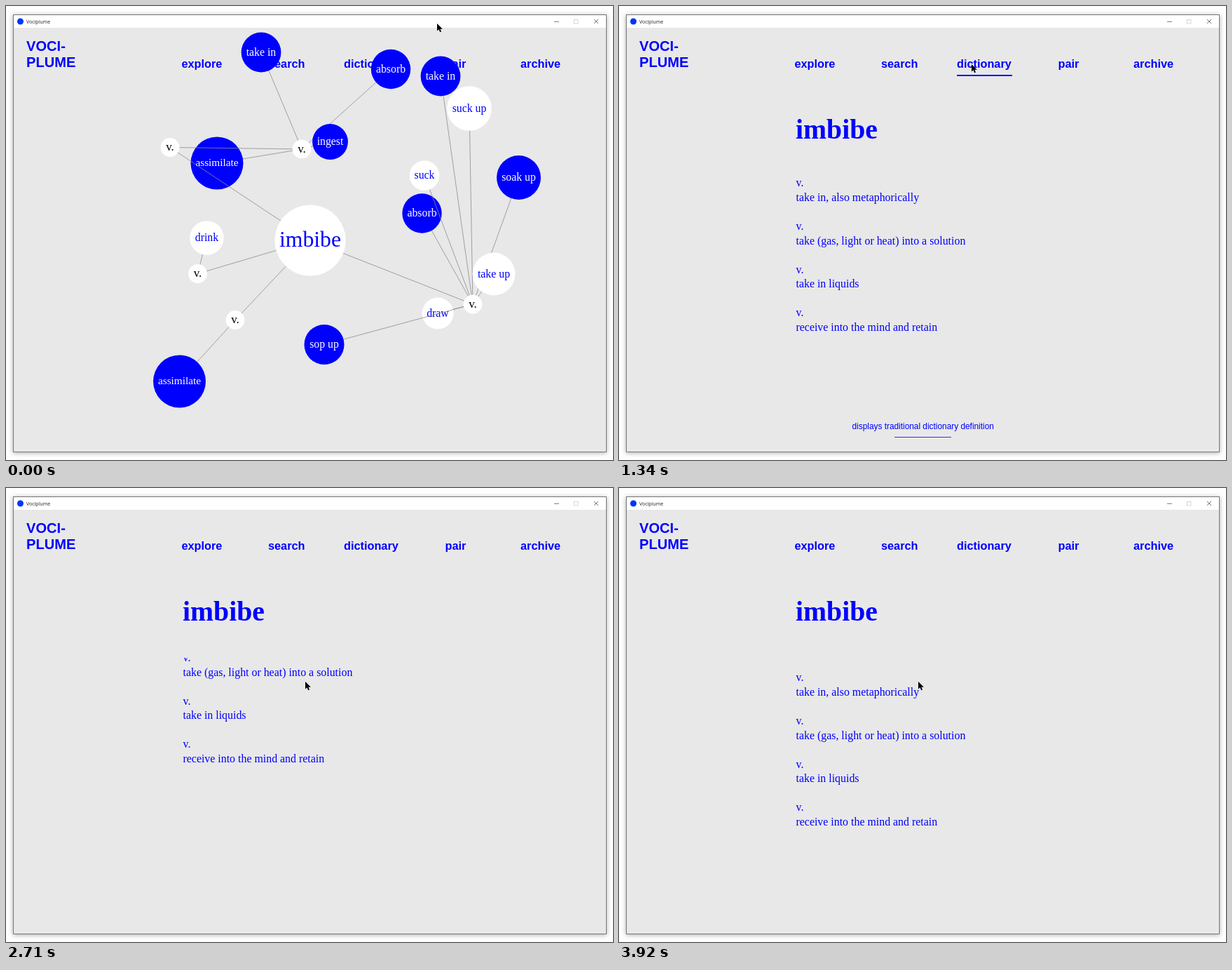
An HTML page that plays this animation: 866x647 px, repeating every 4070 ms.

```html
<!DOCTYPE html>
<html lang="en">
<head>
<meta charset="utf-8">
<title>Vociplume</title>
<style>
  html, body { margin: 0; width: 100%; height: 100%; overflow: hidden; background: #fefefe; }
  svg { display: block; }
  text { fill: #00f; white-space: pre; }
  .serif { font: 15.9px "Liberation Serif", serif; }
  .node { text-anchor: middle; }
  .sans { font: 11.87px "Liberation Sans", sans-serif; }
  .nav { font: bold 16.3px "Liberation Sans", sans-serif; }
  .brand { font: bold 20.1px "Liberation Sans", sans-serif; }
  .caption { font: 7px "Open Sans", sans-serif; fill: #222; }
  .head { font: bold 39.7px "Liberation Serif", serif; }
  .edge { stroke: #8c8c8c; stroke-width: .8; }
  .window { fill: #e8e8e8; filter: drop-shadow(0 1px 3px #0005); }
</style>
</head>
<body>
<svg width="866" height="647" viewBox="0 0 866 647">
  <defs><clipPath id="pane"><rect x="240" y="242" width="400" height="330"/></clipPath></defs>
  <rect class="window" x="10" y="12" width="847" height="624"/>
  <rect x="10" y="12" width="847" height="19" fill="#fff"/>
  <rect x="10.5" y="12.5" width="846" height="623" fill="none" stroke="#777"/>
  <circle cx="20.5" cy="22" r="4.5" fill="#0433ff"/>
  <text class="caption" x="29" y="24.7">Vociplume</text>
  <g fill="none" stroke="#555" stroke-width=".8">
    <path d="M782 22.3h7M839 19l6 6m0-6l-6 6"/>
    <rect x="810.5" y="19.5" width="5.5" height="5.5" stroke="#ccc"/>
  </g>
  <text class="brand" x="29" y="64">VOCI-</text>
  <text class="brand" x="29" y="87">PLUME</text>
  <g id="nav"></g>
  <rect id="underline" x="482" y="98" width="79" height="2" fill="#00f"/>
  <g id="graph"></g>
  <g id="entry">
    <text class="head" x="252" y="189">imbibe</text>
    <g clip-path="url(#pane)"><g id="list"></g></g>
  </g>
  <g id="hint">
    <text class="sans" x="332.5" y="603">displays traditional dictionary definition</text>
    <path d="M393 614.5h81" stroke="#00f" stroke-width=".8"/>
  </g>
  <path id="cursor" d="M0 0V10.5L2.5 8.3L4.2 12.2L6 11.4L4.4 7.7H7.8Z"/>
</svg>
<script>
const $ = id => document.getElementById(id);

function add(parent, tag, attrs, content = "") {
  const el = document.createElementNS("http://www.w3.org/2000/svg", tag);
  for (const key in attrs) el.setAttribute(key, attrs[key]);
  el.textContent = content;
  parent.append(el);
}

[["explore", 250.5], ["search", 374], ["dictionary", 482], ["pair", 626.5], ["archive", 734]]
  .forEach(([word, x]) => add($("nav"), "text", { class: "nav", x, y: 88 }, word));

const BLUE = "#00f", WHITE = "#fff";

function edge([x1, y1], [x2, y2]) {
  add($("graph"), "line", { class: "edge", x1, y1, x2, y2 });
}

function node(word, cx, cy, r, fill, ink, size = 15.8) {
  add($("graph"), "circle", { cx, cy, r, fill });
  add($("graph"), "text", {
    class: "serif node", x: cx, y: cy + size * .29,
    style: `font-size:${size}px;fill:${ink}`
  }, word);
}

// A synonym hangs on its sense; filled ones are blue.
function leaf(sense, word, x, y, r, filled) {
  edge(sense, [x, y]);
  node(word, x, y, r, filled ? BLUE : WHITE, filled ? WHITE : BLUE, word == "assimilate" ? 15.3 : 15.8);
}

const center = [434, 334];
const far = [234, 201.5], ingestion = [422, 204], drinking = [273.5, 381.5],
      mind = [327, 447.5], soaking = [666, 425];

leaf(ingestion, "assimilate", 301, 224, 37.5, true);
leaf(ingestion, "take in", 364, 66, 28.4, true);
leaf(ingestion, "absorb", 549, 90, 28.2, true);
leaf(ingestion, "ingest", 462.5, 193.5, 25.4, true);
edge(far, ingestion);
leaf(drinking, "drink", 286.5, 330.5, 24.3, false);
leaf(mind, "assimilate", 247.5, 535, 37.5, true);
leaf(soaking, "absorb", 593.5, 295.5, 28.2, true);
leaf(soaking, "suck", 597, 241.5, 21.3, false);
leaf(soaking, "take in", 620, 100, 28.4, true);
leaf(soaking, "suck up", 661, 146, 31.8, false);
leaf(soaking, "soak up", 731.5, 244.5, 31.5, true);
leaf(soaking, "take up", 696, 382, 30.4, false);
leaf(soaking, "draw", 616, 438, 22.5, false);
leaf(soaking, "sop up", 454, 482.5, 28.5, true);
[far, drinking, mind, soaking].forEach(sense => edge(center, sense));
[far, ingestion, drinking, mind, soaking].forEach(([x, y]) => node("v.", x, y, 13.4, WHITE, "#000", 17));
node("imbibe", ...center, 50.6, WHITE, BLUE, 31.7);

["take in, also metaphorically", "take (gas, light or heat) into a solution",
 "take in liquids", "receive into the mind and retain"].forEach((line, i) => {
  const y = 257.3 + i * 61.7;
  add($("list"), "text", { class: "serif", x: 252.5, y }, "v.");
  add($("list"), "text", { class: "serif", x: 252.5, y: y + 20.5 }, line);
});

const LOOP = 4070;
// Each row: start time, value(s) held until the next row.
const pointer = [
  [0, 615, 25], [150, 567, 39], [290, 541, 59], [430, 513, 77], [580, 503, 83], [730, 503, 82],
  [1340, 503, 83], [1490, 470, 145], [1650, 429, 276], [1800, 427, 281], [1960, 427, 280],
  [2120, 427, 277], [2410, 427, 276]
];
const scroll = [
  [0, 0], [1650, 6], [1800, -18], [2120, -24], [2260, -48], [2560, -54], [2710, -72],
  [3170, -48], [3320, -42], [3470, -24], [3610, -12], [3920, 18]
];
const held = (rows, t) => rows.findLast(row => row[0] <= t);
const show = (id, on) => $(id).style.display = on ? "" : "none";

function draw(now) {
  const t = now % LOOP;
  const [, x, y] = held(pointer, t);
  const hover = t >= 580 && t < 1490;
  $("cursor").setAttribute("transform", `translate(${x} ${y})`);
  $("list").setAttribute("transform", `translate(0 ${held(scroll, t)[1]})`);
  show("underline", hover);
  show("hint", hover);
  show("graph", t < 880);
  show("entry", t >= 880);
}

const start = performance.now();
function tick() {
  draw(performance.now() - start);
  requestAnimationFrame(tick);
}
tick();
</script>
</body>
</html>
```
